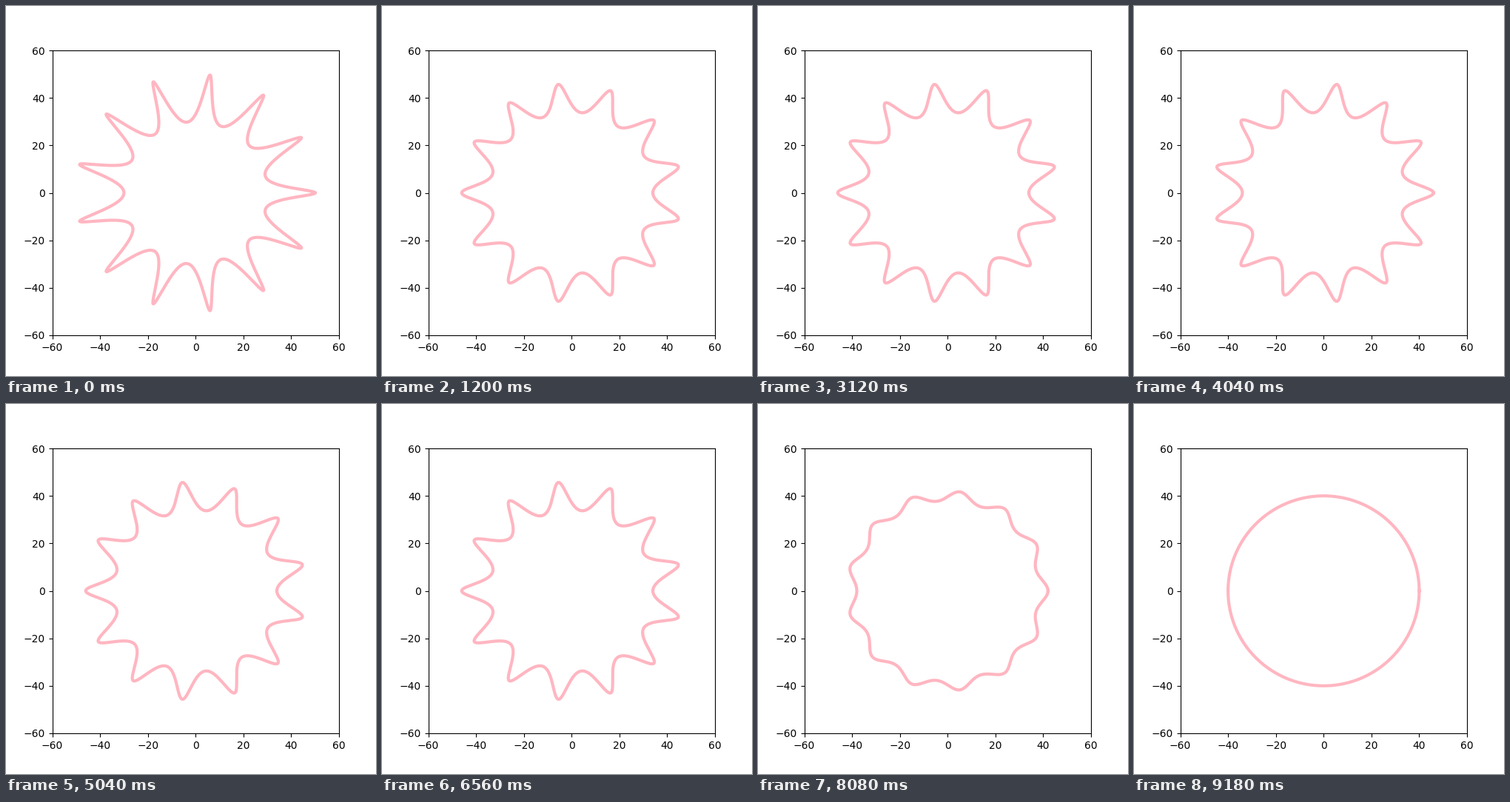
Animation, 500 px wide and 500 px high, one loop 9.28 s. Source, as a matplotlib script:

```python
import numpy as np
import matplotlib.pyplot as plt
from matplotlib.animation import FuncAnimation

TICK = 20            # ms per animation frame
LOOP = 9280          # ms
STEP = 100           # ms each pose is held
CYCLE = 19 * STEP + TICK
RADIUS, PETALS = 40, 13
SWAY = 0.27          # sideways share of the wave, narrows the outer tips

theta = np.linspace(0, 2 * np.pi, 1000)
wave = np.cos(PETALS * theta) - 1j * SWAY * np.sin(PETALS * theta)

fig, ax = plt.subplots(figsize=(5, 5), dpi=100)
ax.set_xlim(-60, 60)
ax.set_ylim(-60, 60)
line, = ax.plot([], [], color="lightpink", linewidth=3)


def amplitude(ms):
    """Triangle wave 10 .. -10 .. 10; later peaks last only one tick."""
    phase = max(ms - (STEP - TICK), 0) % CYCLE
    step = 0 if phase < TICK else 1 + (phase - TICK) // STEP
    return 2 * abs(step - 10) - 10


def update(frame):
    # Radial (real) and tangential (imaginary) offsets, turned around the ring.
    points = (RADIUS + amplitude(frame * TICK) * wave) * np.exp(1j * theta)
    line.set_data(points.real, points.imag)
    return line,


anim = FuncAnimation(fig, update, frames=LOOP // TICK, interval=TICK,
                     blit=True, repeat=True, repeat_delay=0)
plt.show()
```
